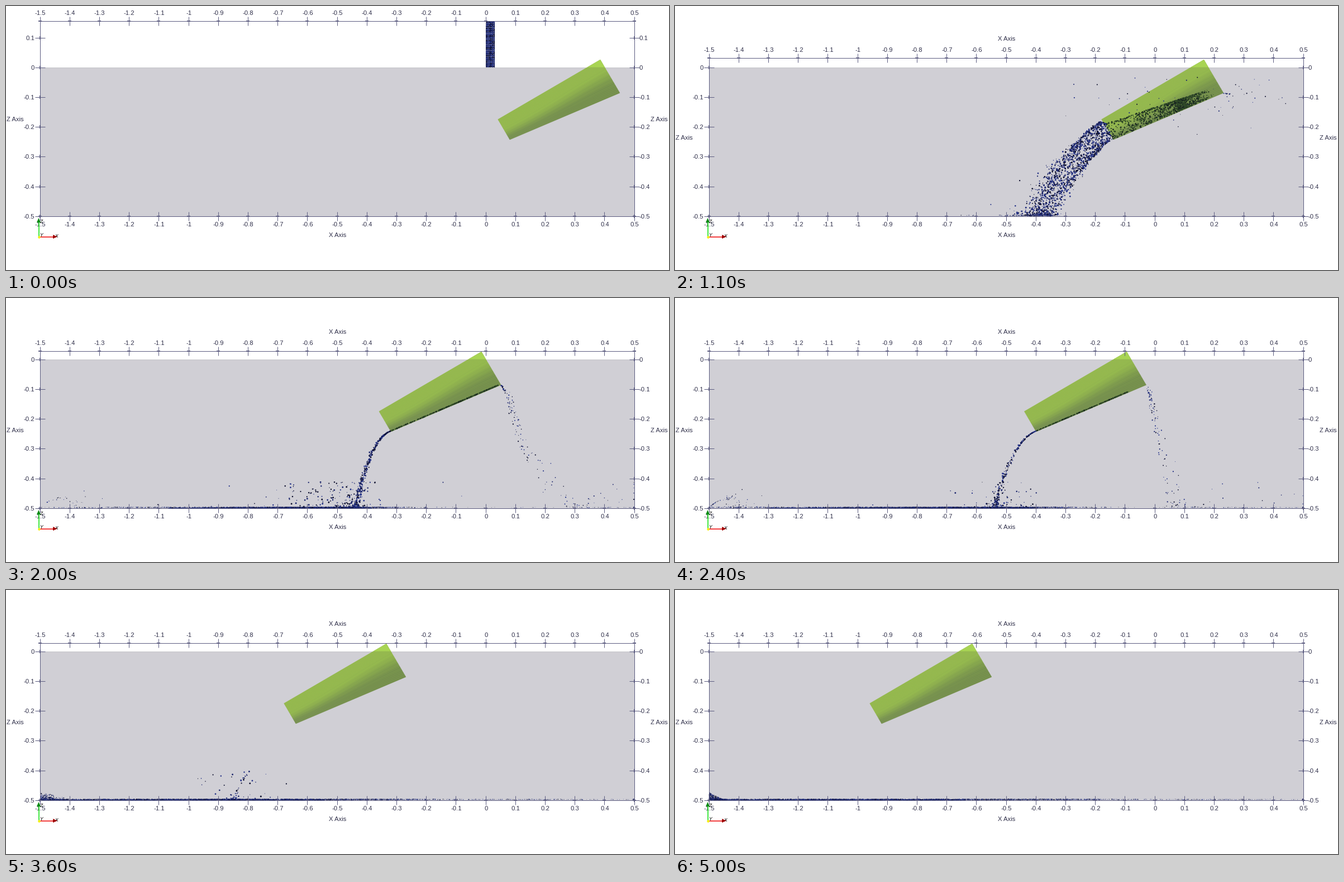
Animation of 1187x472 px, one loop 5.05 s. Source, as a matplotlib script:

```python
import numpy as np
import matplotlib.pyplot as plt
from matplotlib.animation import FuncAnimation
from matplotlib.collections import LineCollection, PolyCollection
from matplotlib.transforms import Affine2D

W, H, DPI = 1187, 472, 64
PT = 72 / DPI                # points per pixel
FRAMES, DT = 101, 0.02       # simulated seconds per step
SCALE, G = 532, 9.81
FLOOR, WALL = -0.4985, -1.5
SPEED = 0.5                  # scoop speed to the left
LEFT, RIGHT, BASE = 60.5, 1124.5, 376.3
INK, SLATE, GREY = "#30304a", "#5c5c80", "#d0cfd5"
rng = np.random.default_rng(7)


def px(x):
    return LEFT + SCALE * (np.asarray(x) + 1.5)


def py(z):
    return 109.8 - SCALE * np.asarray(z)


# ---------- water ----------
SLOPE = 0.4264
ALONG = np.array([0.92, 0.392])
ACROSS = np.array([-0.392, 0.92])
DEPTH = 0.074                # opening of the scoop at its tip


def tip(t):
    return 0.081 - SPEED * t


# falling column, landing inside the scoop
N = 3200
k = np.arange(N)
col_x = 0.0035 + 0.0252 * (k % 6) / 5
col_z = 0.003 + 0.149 * (k // 6 % 30) / 29
t_land = np.full(N, 0.24)
for _ in range(6):
    hit_z = np.maximum(-0.243 + SLOPE * (col_x - tip(t_land)), -0.243)
    t_land = np.sqrt((col_z - hit_z) / (G / 2))
s_land = np.maximum(col_x - tip(t_land), 0) / ALONG[0]

stay = rng.exponential(0.16, N) % 0.6 + 0.004
late = rng.random(N) < 0.17
stay[late] = rng.uniform(0.2, 1.05, late.sum())
run = 1.38 * stay + 0.8 * rng.random(N) * np.clip(2 - 2.5 * stay, 0, 1)
lift = DEPTH * rng.beta(0.6, 0.55, N)


def in_scoop(t):
    u = np.clip((t - t_land) / stay, 0, 1)
    s = np.minimum((1 - u) * (s_land + run * u), 0.4)
    thin = np.exp(-np.maximum(t - 0.42, 0) / 0.08)
    rise = np.clip((t - t_land) / 0.05, 0, 1)
    h = lift * thin * rise * (1 - 1.5 * s) + 0.002
    return (tip(t) + s * ALONG[0] + h * ACROSS[0],
            -0.243 + s * ALONG[1] + h * ACROSS[1])


t_out = t_land + stay
out_x, out_z = in_scoop(t_out)
rel = np.interp(t_out, [0.22, 0.27, 0.36, 0.6, 0.92, 1.25],
                [1.5, 1.4, 1.0, 0.55, 0.8, 1.15])
early = np.exp(-np.maximum(t_out - 0.25, 0) / 0.12)
high = lift / DEPTH * early
out_vx = -SPEED - rel + rng.normal(0, 1, N) * (0.025 + 0.08 * early)
out_vz = (-SLOPE * rel * (1 - 0.7 * high) - 0.35 * early
          + rng.normal(0, 1, N) * (0.025 + 0.08 * early))

# drops leaving over the rear edge
R = 230
r_t = 0.42 + 0.5 * rng.random(R) ** 1.1
r_vx = np.interp(r_t, [0.42, 0.52, 0.6, 0.92], [1.3, 0.85, 0.4, 0.15])
r_vx = r_vx - SPEED + rng.normal(0, 0.06, R)

# spray thrown up at the impact
S = 60
s_t = rng.uniform(0.21, 0.3, S)
s_vx = rng.uniform(-1.5, 2.3, S)
s_vz = rng.uniform(0.6, 1.4, S)

t0 = np.r_[t_out, r_t, s_t]
x0 = np.r_[out_x, 0.451 - SPEED * r_t, rng.uniform(-0.06, 0.06, S)]
z0 = np.r_[out_z, np.full(R, -0.087), np.full(S, -0.13)]
vx = np.r_[out_vx, r_vx, s_vx]
vz = np.r_[out_vz, rng.normal(-0.1, 0.08, R), s_vz]
M = len(t0)

t_hit = t0 + (vz + np.sqrt(vz ** 2 + 2 * G * (z0 - FLOOR))) / G
x_hit = x0 + vx * (t_hit - t0)
hops = rng.random(M) < 0.6
hop = np.where(hops, np.minimum(rng.exponential(0.5, M), 1.3), 0)
film = 0.002 * rng.random(M)

# sliding along the floor; the first water shoots ahead
slide = out_vx * np.where(hops[:N], rng.uniform(-0.25, 1.1, N),
                          rng.uniform(0.1, 1.8, N))
ahead = rng.random(N) < 0.03 + 0.12 * (t_hit[:N] < 0.44)
slide[ahead] = out_vx[ahead] * rng.uniform(1.2, 3.2, ahead.sum())
v_floor = np.r_[slide, rng.normal(0.1, 0.35, R), 0.4 * s_vx]
DRAG = 0.7

# arrival at the left wall and the pile there
reach = (x_hit - WALL) / np.maximum(-v_floor * DRAG, 1e-6)
t_wall = np.where((v_floor < 0) & (reach < 1),
                  t_hit - DRAG * np.log(1 - np.clip(reach, 0, 0.999)), 99)
kick = np.exp(-np.maximum(t_wall - 1.06, 0) / 0.18) * rng.uniform(0.92, 1.06, M)
kick += 0.5 * rng.random(M) ** 4
pile_f = rng.random(M) ** 2
pile_x = 0.06 * pile_f
pile_z = 0.025 * rng.random(M) * (1 - pile_f) ** 1.5

NAVY = np.array([[26, 36, 108], [12, 14, 44], [36, 50, 136]]) / 255
MOSS = np.array([[44, 68, 40], [24, 38, 32], [52, 80, 40]]) / 255
tone = rng.integers(0, 3, M)
diam = rng.uniform(1.0, 3.0, M)
diam[N:] = rng.uniform(0.9, 2.2, M - N)


def water(t):
    a = t - t0
    x, z = x0 + vx * a, z0 + vz * a - G / 2 * a ** 2

    b = np.maximum(t - t_hit, 0)
    down = t >= t_hit
    arc = hop * b - G / 2 * b ** 2
    fx = x_hit + v_floor * DRAG * (1 - np.exp(-b / DRAG))
    fz = FLOOR + np.maximum(arc, film)

    c = np.maximum(t - t_wall, 0)
    at_wall = t >= t_wall
    air = 2 * 0.77 * kick / G
    back = 0.85 * kick * np.minimum(c, air)
    settle = np.exp(-np.maximum(c - air, 0) / 0.15)
    wx = WALL + back * settle + pile_x * (1 - settle)
    wz = FLOOR + np.maximum(0.77 * kick * c - G / 2 * c ** 2, pile_z * (1 - settle))

    x = np.where(down, np.where(at_wall, wx, fx), x)
    z = np.where(down, np.where(at_wall, wz, fz), z)
    x = np.clip(x, WALL + 0.002, 0.499)
    x = np.where(a < 0, -9, x)

    sx, sz = in_scoop(t)
    falling = t < t_land
    inside = ~falling & (t < t_out)
    x[:N] = np.where(falling, col_x, np.where(inside, sx, x[:N]))
    z[:N] = np.where(falling, col_z - G / 2 * t * t, np.where(inside, sz, z[:N]))

    colour = NAVY[tone]
    colour[:N][inside] = MOSS[tone[:N][inside]]
    size = np.where(down & (at_wall | (arc < film)), 0.55 * diam, diam)
    size[:N][falling] = 2.1
    return np.c_[px(x), py(z)], colour, (size * PT) ** 2


# ---------- stage ----------
fig = plt.figure(figsize=(W / DPI, H / DPI), dpi=DPI, facecolor="white")
ax = fig.add_axes([0, 0, 1, 1])
ax.set(xlim=(0, W), ylim=(H, 0))
ax.axis("off")

ax.fill([LEFT, RIGHT, RIGHT, LEFT], [109.5, 109.5, 376, 376], color=GREY, lw=0)
ax.plot([LEFT, RIGHT], [109.5, 109.5], color="#c3c3c8", lw=PT)

# scoop: strips shaded from the upper to the lower edge
upper = np.array([[880.7, 202.7], [1064, 96]])
lower = np.array([[902, 239], [1099, 155.5]])
K = 30
along = np.linspace(0, 1, 13)[:, None]


def rail(v):
    bend = v + 0.10 * np.sin(np.pi * v) * np.cos(np.pi * along)
    a = upper[0] + (upper[1] - upper[0]) * along
    b = lower[0] + (lower[1] - lower[0]) * along
    return a + (b - a) * bend


strips, shades = [], []
LIGHT, DARK = np.array([147, 184, 74]), np.array([116, 143, 74])
for i in range(K):
    strips.append(np.r_[rail(i / K), rail((i + 1) / K)[::-1]])
    f = np.clip(((i + 0.5) / K - 0.36) / 0.5, 0, 1)
    f = f * f * (3 - 2 * f) + 0.05 * (i % 3 - 1) * (0 < f < 1)
    shades.append(np.clip(LIGHT + (DARK - LIGHT) * f, 0, 255) / 255)
shift = Affine2D()
scoop = PolyCollection(strips, facecolors=shades, edgecolors=shades,
                       linewidths=0.4, transform=shift + ax.transData, zorder=3)
ax.add_collection(scoop)
cap = PolyCollection([[(1040.8, 109.5), (1064, 96), (1071.9, 109.5)]],
                     facecolors="#a8d453", linewidths=0,
                     transform=shift + ax.transData, zorder=3.1)
ax.add_collection(cap)

film_line, = ax.plot([], [], color="#2c3a86", lw=0.9 * PT, zorder=4,
                     solid_capstyle="butt")
drops = ax.scatter(np.zeros(M), np.zeros(M), lw=0, zorder=5)

frame = LineCollection([], colors=SLATE, linewidths=PT, zorder=6)
stars = LineCollection([], colors=SLATE, linewidths=1.9 * PT, zorder=6)
ax.add_collection(frame)
ax.add_collection(stars)


def label(x, y, s, ha="center", size=11.3, color=INK, **kw):
    return ax.text(x, y, s, ha=ha, va="center_baseline", color=color, zorder=7,
                   family="Liberation Sans", size=size * PT, **kw)


x_ticks = np.arange(-15, 6) / 10
z_ticks = np.arange(-5, 2) / 10
top_labels = [label(px(v) + 0.7, 0, f"{v:g}") for v in x_ticks]
for v in x_ticks:
    label(px(v) + 0.7, 390, f"{v:g}")
z_labels = [(label(51, py(v), f"{v:g}", "right"),
             label(1134, py(v), f"{v:g}", "left")) for v in z_ticks]
label(593.2, 409, "X Axis")
top_title = label(593.2, 0, "X Axis")
side_titles = [label(16.5, 0, "Z Axis"), label(1169.5, 0, "Z Axis")]

# orientation marker
ax.plot([58.5, 58.5], [412, 386], color="#14e014", lw=1.6 * PT, zorder=8)
ax.fill([55, 62, 58.5], [387, 387, 379], color="#0a8a14", lw=0, zorder=8)
ax.plot([58.5, 85], [412.5, 412.5], color="#f01010", lw=1.6 * PT, zorder=8)
ax.fill([84, 84, 92], [409, 416, 412.5], color="#a00808", lw=0, zorder=8)
ax.plot([58.5], [412.5], "o", color="#f4f010", ms=4.5 * PT, mew=0, zorder=8)
for x, y, s in [(62.5, 384, "Z"), (62.5, 409, "Y"), (89.5, 410, "X")]:
    label(x, y, s, size=8.5, color="black", style="italic")


def box_top(n):
    column = 0.155 - G / 2 * (n * DT) ** 2
    return max(column, np.interp(n, [22, 30], [0.031, 0.027]))


def draw_box(n):
    top = box_top(n)
    yt = float(py(top))
    lines = [[(LEFT, yt), (RIGHT, yt)], [(LEFT, BASE), (RIGHT, BASE)],
             [(LEFT, yt), (LEFT, BASE)], [(RIGHT, yt), (RIGHT, BASE)]]
    centre = []
    for v in x_ticks:
        x = float(px(v))
        for y in (yt, BASE):
            lines.append([(x, y - 8), (x, y + 8)])
            centre.append([(x - 3, y), (x + 3, y)])
    for v, pair in zip(z_ticks, z_labels):
        shown = v <= top
        for txt in pair:
            txt.set_visible(shown)
        if shown:
            y = float(py(v))
            for x in (LEFT, RIGHT):
                lines.append([(x - 9, y), (x + 9, y)])
                centre.append([(x, y - 3), (x, y + 3)])
    frame.set_segments(lines)
    stars.set_segments(centre)
    for txt in top_labels:
        txt.set_y(yt - 15.5)
    top_title.set_y(yt - 35.5)
    for txt in side_titles:
        txt.set_y((yt + BASE) / 2)


def update(n):
    t = n * DT
    draw_box(n)
    shift.clear().translate(-SPEED * t * SCALE, 0)
    pos, colour, size = water(t)
    drops.set_offsets(pos)
    drops.set_facecolor(colour)
    drops.set_sizes(size)
    left = np.interp(n, [22, 40, 52, 58], [655, 290, 105, 62])
    right = np.interp(n, [22, 40, 56, 72, 100], [690, 655, 640, 570, 520])
    film_line.set_data([left, right] if n >= 23 else [], [375, 375] if n >= 23 else [])
    return []


anim = FuncAnimation(fig, update, frames=FRAMES, interval=50, repeat=True,
                     repeat_delay=0, blit=False)
plt.show()
```
